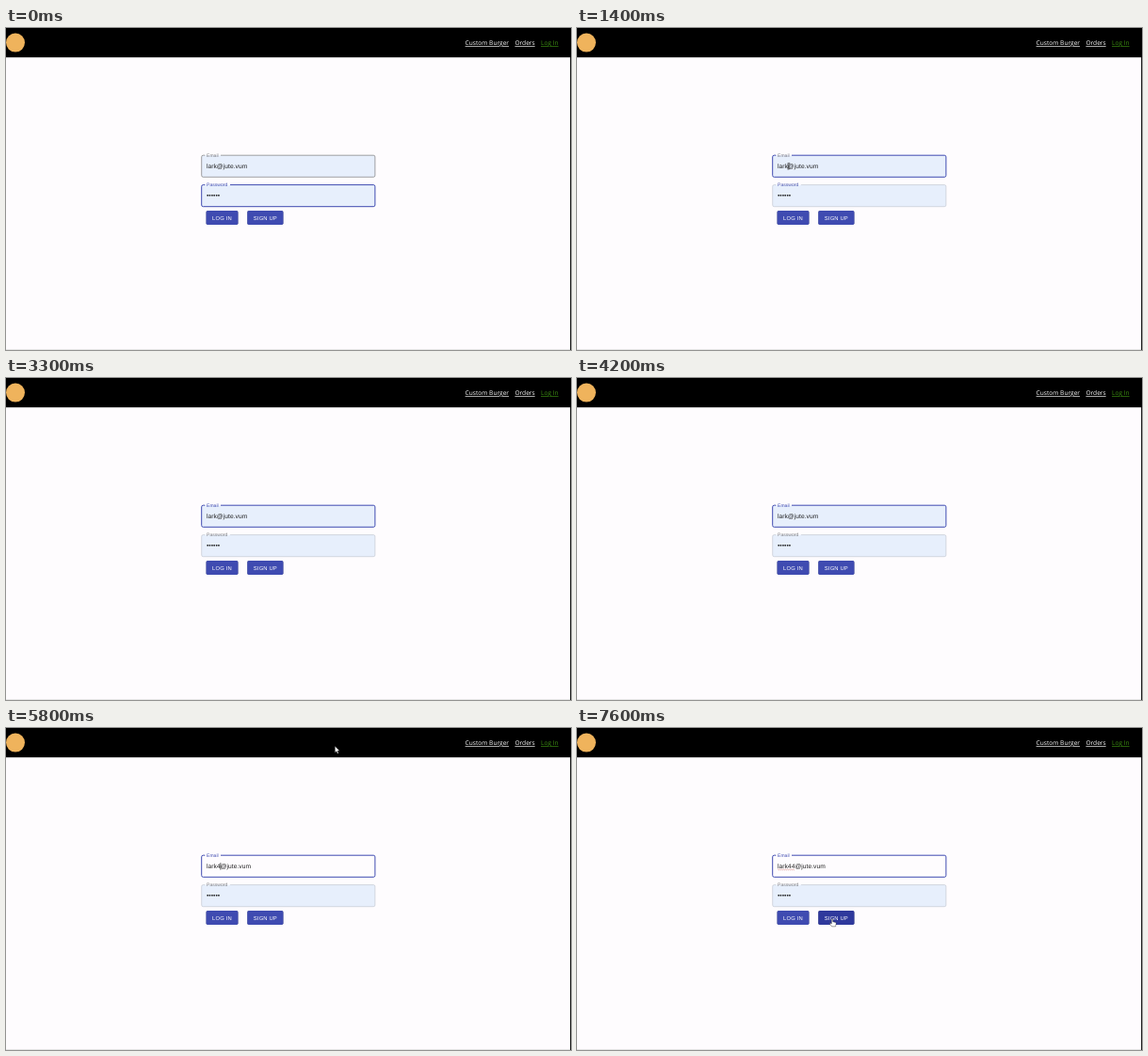
Animation, 600 px wide and 342 px high, one loop 8 s. Source, as an HTML page:

```html
<!DOCTYPE html>
<html lang="en">
<head>
<meta charset="utf-8">
<title>Log in form</title>
<style>
  html, body { margin: 0; width: 100%; height: 100%; overflow: hidden; background: #fefcfe; }
  svg { display: block; width: 100vw; height: 100vh; }
  text { font: 6.67px "Liberation Sans", Arial, sans-serif; letter-spacing: .0094em; text-rendering: geometricPrecision; }
  .nav text { font: 6.6px "Open Sans", sans-serif; letter-spacing: 0; fill: #fff; text-decoration: underline; }
  .nav .active { fill: #3c8d12; }
  .label { font-size: 5px; }
  .value { fill: #222; }
  .button text { font-size: 5.83px; letter-spacing: .0286em; fill: #fff; }
  .outline { fill: none; }
  .button .face { filter: drop-shadow(0 .9px .7px #0006); }
</style>
</head>
<body>
<svg viewBox="0 0 600 342">
  <rect width="600" height="342" fill="#fefcfe"/>
  <path d="M0 341.6H599" stroke="#ddd" stroke-width=".8"/>
  <path d="M599.5 31V342" stroke="#222"/>
  <rect width="600" height="31.2"/>
  <circle cx="10" cy="15.6" r="10" fill="#efb35c"/>
  <g class="nav">
    <text x="487.6" y="18">Custom Burger</text>
    <text x="540.4" y="18">Orders</text>
    <text x="568" y="18" class="active">Log In</text>
  </g>

  <g id="email">
    <rect class="fill" x="207.7" y="135.2" width="184.2" height="23.1" rx="1.7"/>
    <path class="outline" d="M228 135.2H390.2a1.7 1.7 0 0 1 1.7 1.7V156.6a1.7 1.7 0 0 1-1.7 1.7H209.4a1.7 1.7 0 0 1-1.7-1.7V136.9a1.7 1.7 0 0 1 1.7-1.7H211.3"/>
    <text class="label" x="213" y="137">Email</text>
    <text class="value" x="212.9" y="149.1"></text>
  </g>
  <g id="password">
    <rect class="fill" x="207.7" y="166.6" width="184.2" height="23.1" rx="1.7" fill="#e7effc"/>
    <path class="outline" d="M238 166.6H390.2a1.7 1.7 0 0 1 1.7 1.7V188a1.7 1.7 0 0 1-1.7 1.7H209.4a1.7 1.7 0 0 1-1.7-1.7V168.3a1.7 1.7 0 0 1 1.7-1.7H211.3"/>
    <text class="label" x="213" y="168.4">Password</text>
    <text class="value" x="212.9" y="180.2">••••••</text>
  </g>
  <path id="squiggle" fill="none" stroke="#c9685f" stroke-width=".5"/>
  <path id="caret" stroke="#111" stroke-width=".7"/>

  <g class="button">
    <rect class="face" x="212.5" y="194.1" width="34" height="14.9" rx="1.7" fill="#3f4bb1"/>
    <text x="219.1" y="203.7">LOG IN</text>
  </g>
  <g class="button">
    <rect class="face" id="signup" x="256.2" y="194.1" width="38.3" height="14.9" rx="1.7"/>
    <text x="262.8" y="203.7">SIGN UP</text>
  </g>

  <g id="mouse">
    <path id="beam" d="M-1 -3.2H1M0 -3.2V3.2M-1 3.2H1" fill="none" stroke="#333" stroke-width=".5"/>
    <path id="arrow" d="M0 0V7L1.6 5.5L2.7 8L3.9 7.5L2.8 5.1H5Z" fill="#fff" stroke="#111" stroke-width=".4"/>
    <path id="hand" d="M-.7 .4Q0 -.5 .7 .4V3L3.6 3.6Q4.4 3.9 4.2 4.9L3.6 8H-.4L-2.6 5.2Q-2.7 4.2 -1.7 4.4L-.7 5.2Z" fill="#fff" stroke="#111" stroke-width=".4"/>
  </g>
</svg>
<script>
  const LOOP = 8000, BLINK = 535;
  const FOCUS = 1380, KEY1 = 5760, KEY2 = 5920, SQUIGGLE = 7300, HOVER = 7120;
  const BLUE = [63, 75, 177], NAVY = [47, 57, 156], GREY = [122, 122, 126];
  const PATH = [ // time, x, y
    [600, 241, 149], [1100, 225.3, 146.6], [2350, 225.3, 146.6], [2650, 238, 116],
    [4700, 349.3, 19.2], [6250, 349.3, 19.2], [6800, 267.6, 192], [6950, 267.6, 192.3], [7250, 271, 202.8]
  ];
  const $ = s => document.querySelector(s);
  const clamp = v => Math.max(0, Math.min(1, v));
  const mix = (a, b, k) => `rgb(${a.map((v, i) => v + (b[i] - v) * k)})`;
  const show = (el, on) => el.setAttribute("visibility", on ? "visible" : "hidden");
  const [caret, squiggle, mouse, beam, arrow, hand, signup] =
    ["caret", "squiggle", "mouse", "beam", "arrow", "hand", "signup"].map(id => $("#" + id));

  let wave = "M213 150.4";
  for (let x = 0; x < 9; x++) wave += "q.5 -.8 1 0t1 0";
  squiggle.setAttribute("d", wave);

  function styleField(id, focused, idleBorder, focusAmount) {
    const line = $(`#${id} .outline`);
    line.setAttribute("stroke", focused ? mix(BLUE, BLUE, 0) : idleBorder);
    line.setAttribute("stroke-width", focused ? 1 : .6);
    $(`#${id} .label`).setAttribute("fill", mix(GREY, BLUE, focusAmount));
  }

  function mouseAt(t) {
    let i = PATH.findIndex(p => p[0] > t);
    if (i < 0) i = PATH.length;
    const a = PATH[Math.max(0, i - 1)], b = PATH[Math.min(i, PATH.length - 1)];
    const k = clamp((t - a[0]) / (b[0] - a[0] || 1)), e = k * k * (3 - 2 * k);
    return [a[1] + (b[1] - a[1]) * e, a[2] + (b[2] - a[2]) * e];
  }

  function draw(t) {
    const onEmail = t >= FOCUS, typed = (t >= KEY1) + (t >= KEY2);
    const k = clamp((t - FOCUS) / 200);
    styleField("email", onEmail, "#666", k);
    styleField("password", !onEmail, "#bcc2cc", 1 - k);
    $("#email .fill").setAttribute("fill", typed ? "#fefcfe" : "#e7effc");
    $("#email .value").textContent = "lark" + "4".repeat(typed) + "@jute.vum";

    const since = t - [onEmail ? FOCUS : -BLINK, KEY1, KEY2][typed];
    const x = onEmail ? 224.1 + typed * 3.77 : 227.8, y = onEmail ? 143.2 : 174.6;
    caret.setAttribute("d", `M${x} ${y}v7.4`);
    show(caret, Math.floor(since / BLINK) % 2 === 0);
    show(squiggle, t >= SQUIGGLE);

    const [mx, my] = mouseAt(t);
    mouse.setAttribute("transform", `translate(${mx} ${my})`);
    const inField = t < 3000 && my > 135;
    show(beam, t >= 600 && inField);
    show(arrow, t >= 600 && !inField && (t < 2650 || t >= 4700) && t < HOVER);
    show(hand, t >= HOVER);
    signup.setAttribute("fill", mix(BLUE, NAVY, clamp((t - HOVER) / 250)));
  }

  const start = performance.now();
  function tick() {
    draw((performance.now() - start) % LOOP);
    requestAnimationFrame(tick);
  }
  tick();
</script>
</body>
</html>
```
